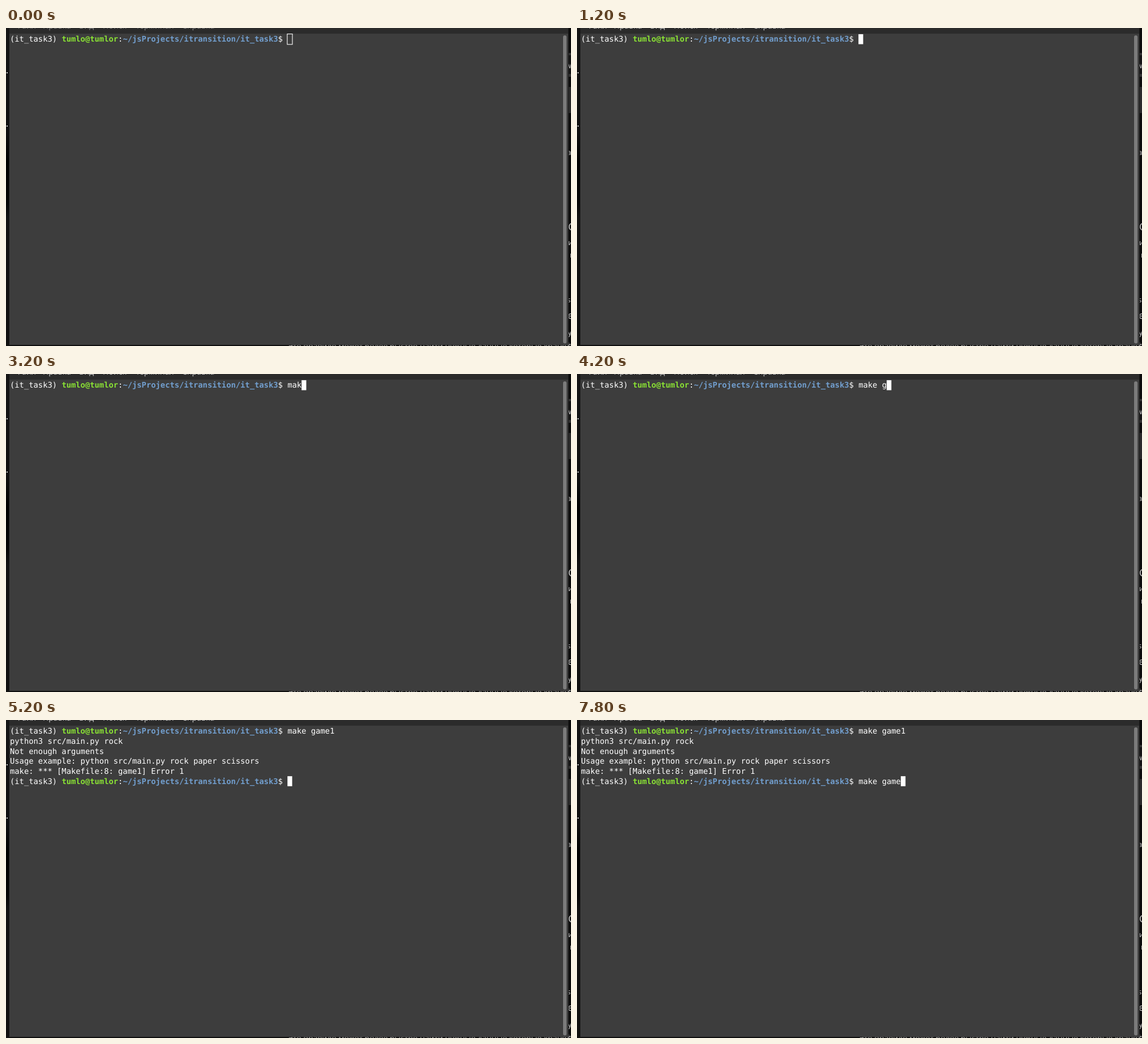
Animation, 998 px wide and 561 px high, one loop 8 s. Source, as an HTML page:

```html
<!DOCTYPE html>
<html lang="ru">
<head>
<meta charset="utf-8">
<title>Terminal</title>
<style>
  html, body { margin: 0; width: 100%; height: 100%; overflow: hidden; background: #0c0c0c; }
  svg { display: block; width: 998px; height: 561px; }
  text { white-space: pre; text-rendering: geometricPrecision; }
  .term { font: 13.8px "DejaVu Sans Mono", monospace; fill: #fff; }
  .user { font-weight: bold; fill: #8ae234; }
  .path { font-weight: bold; fill: #729fcf; }
  .menu { font: 14px "Noto Sans", sans-serif; fill: #858585; }
  .menu.active { fill: #c4c4c4; }
  .page { font-family: "Open Sans", sans-serif; fill: #c8c8c8; }
</style>
</head>
<body>
<svg viewBox="0 0 998 561">
  <defs>
    <linearGradient id="edge" x2="0" y2="1">
      <stop offset="0" stop-color="#161616"/>
      <stop offset=".33" stop-color="#101010"/>
      <stop offset=".42" stop-color="#000"/>
      <stop offset=".55" stop-color="#060606"/>
      <stop offset=".6" stop-color="#131313"/>
      <stop offset="1" stop-color="#111"/>
    </linearGradient>
  </defs>

  <rect width="6" height="561" fill="url(#edge)"/>
  <path d="M1 78h2v2h-2zM1 172h2v2h-2z" fill="#ccc"/>
  <rect x="991" width="7" height="561" fill="#0c0c0c"/>
  <path d="M994 44h4v42h-4z" fill="#333"/>
  <path d="M994 48h4v33h-4z" fill="#151515"/>
  <path d="M994 104h4v46h-4z" fill="#2b2b2b"/>
  <g id="page" class="page"></g>

  <rect x="5" width="989" height="559.5" fill="#191919"/>
  <rect x="6" width="987" height="11" fill="#2b2b2b"/>
  <g id="menu" class="menu"></g>
  <rect x="6" y="10" width="987" height="549" fill="#3d3d3d"/>
  <rect x="984" y="13" width="6.2" height="543.5" rx="3" fill="#7b7b7b"/>

  <g class="term">
    <g id="first"></g>
    <g id="output"></g>
  </g>
  <rect id="caret" stroke="#fff"/>
  <path id="mouse" d="M0 0V22.5L5.8 17.3H15.3Z" fill="#000" stroke="#fff" stroke-width="1.6" stroke-linejoin="round"/>
</svg>
<script>
const $ = id => document.getElementById(id);
const LOOP = 8000, LEFT = 7, TOP = 10.9, CW = 8.308, CH = 17.65, PROMPT = 59;
const COMMAND = 'make game1';
const colX = col => LEFT + col * CW;
const rowY = row => TOP + row * CH;

function addText(parent, x, y, str, cls, size) {
  const el = document.createElementNS('http://www.w3.org/2000/svg', 'text');
  el.setAttribute('x', x);
  el.setAttribute('y', y);
  if (cls) el.setAttribute('class', cls);
  if (size) el.setAttribute('font-size', size);
  el.textContent = str;
  parent.append(el);
  return el;
}

const put = (parent, col, row, str, cls) =>
  addText(parent, colX(col), rowY(row) + 13.5, str, cls);

// Draws a prompt and returns the text element for typed input
function addPrompt(parent, row) {
  put(parent, 0, row, '(it_task3)');
  put(parent, 11, row, 'tumlo@tumlor', 'user');
  put(parent, 23, row, ':');
  put(parent, 24, row, '~/jsProjects/itransition/it_task3', 'path');
  put(parent, 57, row, '$');
  return put(parent, PROMPT, row, '');
}

[[17, 'Файл'], [65, 'Правка'], [129, 'Вид'], [171, 'Поиск'], [229, 'Терминал'], [311, 'Справка']]
  .forEach(([x, word]) => addText($('menu'), x, 0.5, word));

[[993, 71, 'w', 14], [991, 224, 'ar', 13], [993, 357, 'C', 18], [993, 383, 'и', 13],
 [996, 405, 'п', 13], [991, 484, 's', 13], [992, 513, 'е', 17], [992, 542, 'у', 15], [992, 562, 'н', 14]]
  .forEach(([x, y, str, size]) => addText($('page'), x, y, str, '', size));
addText($('page'), 498, 566, 'Это правило может более быстро найти нужные данные которые хранятся', '', 14);

const firstInput = addPrompt($('first'), 0);
['python3 src/main.py rock',
 'Not enough arguments',
 'Usage example: python src/main.py rock paper scissors',
 'make: *** [Makefile:8: game1] Error 1']
  .forEach((line, i) => put($('output'), 0, i + 1, line));
const secondInput = addPrompt($('output'), 5);

// time, caret row, typed characters, caret look
const STEPS = [
  [0, 0, 0, 'hollow'], [1000, 0, 0, 'full'], [1700, 0, 0, 'off'], [2400, 0, 0, 'full'],
  [2800, 0, 1, 'full'], [3000, 0, 2, 'full'], [3200, 0, 3, 'full'], [3400, 0, 4, 'full'],
  [4000, 0, 5, 'full'], [4200, 0, 6, 'full'], [4300, 0, 7, 'full'],
  [4600, 0, 8, 'full'], [4700, 0, 9, 'full'], [4900, 0, 10, 'full'],
  [5100, 1, 0, 'full'], [5200, 5, 0, 'full'], [5700, 5, 0, 'off'], [6300, 5, 0, 'full'],
  [6700, 5, 10, 'full'], [7200, 5, 10, 'off'], [7800, 5, 9, 'full']
];
const MOUSE = [[300, 964, 42], [400, 918, 18], [500, 882.5, 4], [600, 867, -13], [700, 0, -50]];
const latest = (list, t) => list.filter(item => item[0] <= t).pop();

function set(el, attrs) {
  for (const name in attrs) el.setAttribute(name, attrs[name]);
}

function draw(t) {
  const [, row, typed, look] = latest(STEPS, t);
  firstInput.textContent = COMMAND.slice(0, row ? COMMAND.length : typed);
  secondInput.textContent = row === 5 ? COMMAND.slice(0, typed) : '';
  $('output').setAttribute('visibility', row === 5 ? 'visible' : 'hidden');
  $('menu').classList.toggle('active', t >= 1000);

  const hollow = look === 'hollow', grow = hollow ? 0.4 : 0;
  set($('caret'), {
    x: colX(row === 1 ? 0 : PROMPT + typed) - grow,
    y: rowY(row) - grow,
    width: CW + 2 * grow,
    height: CH + 2 * grow,
    fill: hollow ? 'none' : '#fff',
    'stroke-width': hollow ? 1.1 : 0,
    visibility: look === 'off' ? 'hidden' : 'visible'
  });

  const [, x, y] = latest(MOUSE, t) || [0, 0, -50];
  $('mouse').setAttribute('transform', `translate(${x} ${y})`);
}

function tick() {
  draw(performance.now() % LOOP);
  requestAnimationFrame(tick);
}
tick();
</script>
</body>
</html>
```
